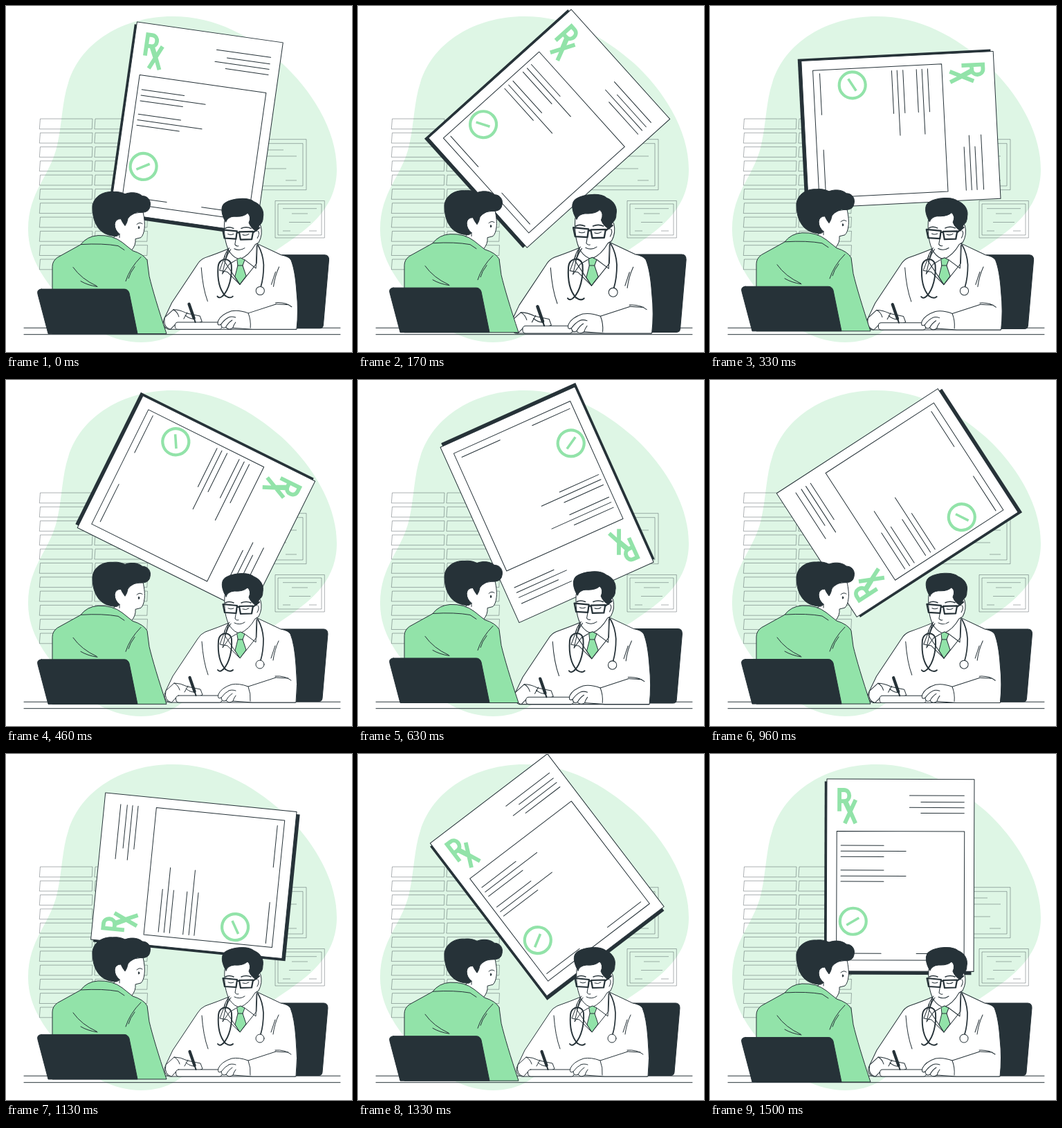
Recreate the animation shown at these times as an HTML page. Size 500 px wide and 500 px high, loop 1.54 s.

```html
<!DOCTYPE html>
<html lang="en">
<head>
<meta charset="utf-8">
<title>Prescription</title>
<style>
  html, body { margin: 0; width: 100%; height: 100%; overflow: hidden; background: #fff; }
  svg { display: block; width: 100vw; height: 100vh; }
  .ink { fill: none; stroke: #263238; stroke-width: 1; stroke-linecap: round; stroke-linejoin: round; }
  .ink .white { fill: #fff; }
  .ink .green { fill: #92e3a9; }
  .ink .dark { fill: #263238; }
  .mark { fill: none; stroke: #92e3a9; }
  .wall { fill: none; stroke: #263238; stroke-width: .9; opacity: .42; }
</style>
</head>
<body>
<svg viewBox="0 0 500 500">
  <path fill="#def6e5" d="M240 15C305 15 355 45 398 82C440 120 478 178 478 236C478 296 432 325 392 352C345 385 305 400 284 432C262 468 234 486 195 486C155 486 118 465 92 436C58 402 32 366 32 323C32 268 64 246 74 201C81 170 81 138 90 111C108 52 170 15 240 15Z"/>

  <path id="wall" class="wall"/>

  <g id="sheet">
    <rect x="165.3" y="40" width="212.7" height="279" fill="#263238"/>
    <g class="ink">
      <rect class="white" x="168.5" y="36.3" width="213" height="277.7"/>
      <path d="M183 111.7H367.5V298H183ZM288 60H367M304.5 69.5H367M288 77.3H367M304.5 85.3H367
        M189 132.3H251M189 140.5H283M189 148.5H251M189 168H251M189 176.5H283M189 184.3H251
        M188 288.3H247.5M298.5 288.3H359"/>
    </g>
    <path class="mark" stroke-width="5.8" d="M186.7 83V52.3H193C203.5 52.3 203.5 68.5 193 68.5H187M194 68.5L201 83M210 66.5L194.5 100.5M196.5 70L210 100.5"/>
    <circle class="mark" stroke-width="4.2" cx="207" cy="242" r="19"/>
    <path class="mark" stroke-width="3.6" d="M197.5 247.5L215.5 237"/>
  </g>

  <path class="ink" d="M26 465.2H483M26 474.7H483"/>

  <g id="doctor" class="ink">
    <path class="dark" d="M398 360H459Q465 360 465 367L457 460Q456.5 464.5 452 464.5H405Z"/>
    <path class="white" d="M322 351Q308 357 288 364Q281 367 277 374L241 428L231 449Q225 461 236 466H419Q422 440 419 412Q417 382 411 367Q408 362 397 360L363 344Z"/>
    <path class="white" d="M324 349L316 369L338 402L362 372L363 344Z"/>
    <path class="white" d="M316 312C315 330 317 344 323 355Q330 365 338 366Q351 361 360 345L365 342Q371 331 368 319L355 296L322 298Z"/>
    <path d="M321 352L313 387L323 373L333 367M362 346L361 379L345 367M317 361L309 382L320 384L338 402"/>
    <path class="green" d="M334 366L339 364L345 367L342 375L347 390L338 402L331 391L335 375Z"/>
    <path d="M335 375H342"/>
    <path class="dark" d="M318 313C312 303 309 290 318 285C328 279 350 277 358 284C368 288 373 297 371 306Q371 314 366 317L362 326Q354 322 351 314Q355 305 349 300Q343 306 330 305Q320 306 318 313Z"/>
    <g stroke-width="2.2">
      <path d="M313.5 324L334 326L332.5 337L316 336ZM337 327L357 326.5L355 337.5L339 338ZM334 328H337M357 328L366 321"/>
      <path stroke-width="1.5" d="M317 322Q322 319 329 322M340 322Q347 319 354 322"/>
    </g>
    <path d="M321 330Q325 332 329 330M342 331Q347 333 351 330M333 333L331 345Q333 348 336 347M330 351Q338 355 345 350M364 326Q367 329 363 336"/>
    <g stroke-width="1.9">
      <path d="M317 418C308 408 306 391 307 377C308 363 325 363 326 375C327 390 323 409 314 418"/>
      <path d="M306 419Q309 423 314 418M317 418Q324 423 328 419"/>
    </g>
    <path d="M323 350Q317 357 315 366M325 352Q320 359 318 366"/>
    <path stroke-width="1.7" d="M364 346Q371 358 372 374Q372 392 368 405"/>
    <circle class="white" cx="367" cy="411" r="6"/>
    <path d="M283 378Q285 407 292 426M394 377Q388 390 386 405M389 384L383 402M389 428Q403 427 412 434M389 430L408 431"/>
    <path class="white" d="M239 466Q228 463 231 449L243 438Q252 438 262 443L281 447L284 455L274 459H246Z"/>
    <path d="M243 438Q249 441 251 448M260 446Q267 452 274 451M263 442L258 451"/>
    <rect class="white" x="245.5" y="456" width="67" height="10" rx="4"/>
    <path stroke-width="4.2" d="M265.5 430L272.5 450"/>
    <path stroke-width="2" d="M272.5 450L274.5 456"/>
    <path class="white" d="M390 430L350 443Q337 438 326 440Q311 445 307 454Q305 462 311 459Q312 466 318 463Q322 468 328 464L356 466H418"/>
    <path d="M350 443Q354 453 353 464M322 449Q316 452 311 459M327 453Q321 457 318 463M332 456Q329 460 328 464M332 449Q326 447 322 449"/>
  </g>

  <g id="patient" class="ink">
    <path class="white" d="M157 308L172 302L198 298C200 307 201 316 200 322Q199 331 195 335L187 337Q188 346 181 354L170 358L145 340L157 334Z"/>
    <path class="dark" d="M160 333C149 333 138 329 132 319C126 310 125 299 125 290C126 278 138 268 154 269C164 268 169 271 172 272C183 268 193 271 197 275C206 275 210 283 208 290C207 298 199 300 190 298C183 301 178 304 176 308Q175 314 172 318Q168 313 166 308Q158 308 157 316Q157 324 164 330Z"/>
    <path d="M164 330V335M189 316Q193 312 197 315"/>
    <ellipse class="dark" cx="192" cy="320.5" rx=".7" ry="1.8"/>
    <path class="green" d="M108 345Q117 333 133 332Q154 331 168 342L183 354Q199 359 204 368L207 391Q214 420 232 474H67V377Q67 369 74 364Z"/>
    <path d="M108 345Q140 343 162 347L171 353M97 378Q109 395 131 405M108 398Q118 404 132 406M195 363Q179 379 173 398M186 377Q179 386 177 394"/>
    <path class="dark" d="M51 409.5H171Q176 409.5 178 415L190 474H61L46 417Q44 410 51 409.5Z"/>
  </g>
</svg>

<script>
const FRAME = 1000 / 24, LOOP = 1540;
const sheet = document.getElementById('sheet');
const doctor = document.getElementById('doctor');
const patient = document.getElementById('patient');

// Shelves and framed certificates
const box = (x1, y1, x2, y2) => `M${x1} ${y1}H${x2}V${y2}H${x1}Z`;
const line = (x1, x2, y) => `M${x1} ${y}H${x2}`;
let wall = '';
for (let row = 0; row < 11; row++) {
  const y = 163 + row * 20.3;
  for (const x of [49.5, 129]) wall += `M${x} ${y}h75.5l-.7 14.8h-76Z`;
}
wall += box(300, 192.7, 434, 265.7) + box(306, 198.7, 429, 260)
  + line(333, 401, 208) + line(314, 420, 217) + line(329, 405, 235) + line(314, 330, 252) + line(404, 420, 252)
  + box(389, 281.5, 460.3, 335) + box(393, 286, 456, 331)
  + line(400, 449, 292.7) + line(413, 436, 300) + line(409, 440, 312.5) + line(400, 411, 325) + line(438, 449, 325);
document.getElementById('wall').setAttribute('d', wall);

// Piecewise linear curve through [position, value] pairs
function curve(points, x) {
  const i = Math.max(1, points.findIndex(p => p[0] >= x));
  const [x0, y0] = points[i - 1], [x1, y1] = points[i];
  return y0 + (y1 - y0) * (x - x0) / (x1 - x0);
}
const spin = [[0, 8.1], [4, 48], [11, 116.4], [15, 155.8], [20, 208], [27, 275.7], [36, 360.2]];
const heartbeat = [[0, 1], [.14, 1.08], [.28, 1], [.33, 1], [.42, 1.03], [.7, 1], [1, 1]];

function draw(now) {
  const step = Math.min(36, Math.floor((now % LOOP + 5) / FRAME));
  const angle = curve(spin, step);
  const phase = angle / 360 % 1;
  const lift = 8.7 * (1 - Math.abs(1 - 2 * phase));
  const beat = curve(heartbeat, phase);
  sheet.setAttribute('transform', `rotate(${angle} 273.5 177.5)`);
  patient.setAttribute('transform', `translate(0 ${-lift})`);
  doctor.setAttribute('transform', `translate(345 374) scale(${beat}) translate(-345 -374)`);
  requestAnimationFrame(draw);
}
draw(performance.now());
</script>
</body>
</html>
```
